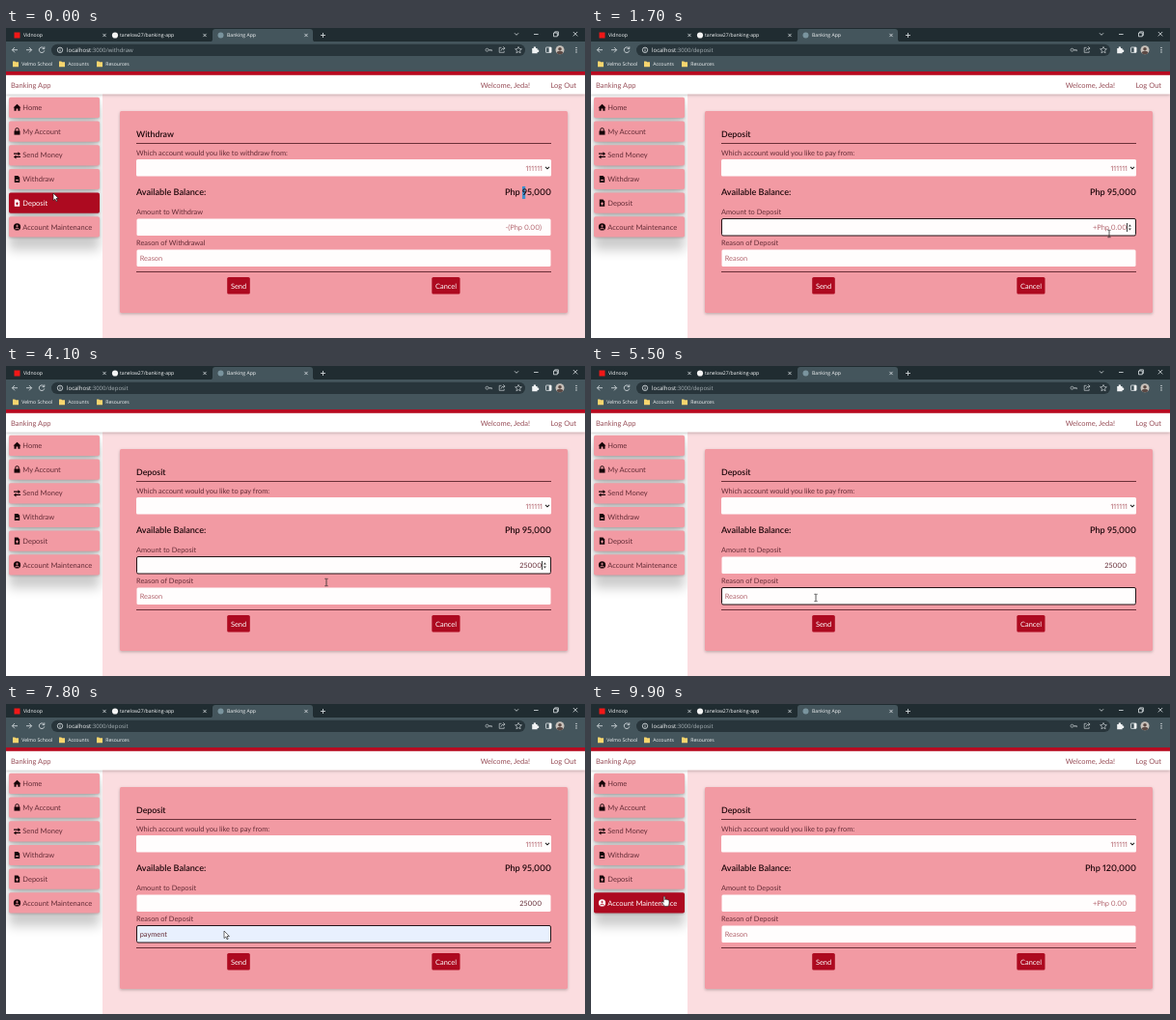
These frames come from a looping animation (600 by 321 pixels, 10 s). An HTML page:

```html
<!DOCTYPE html>
<html lang="en">
<head>
<meta charset="utf-8">
<title>Banking App</title>
<style>
  html, body { margin: 0; width: 100%; height: 100%; overflow: hidden; background: #fbdde0; }
  svg { display: block; width: 600px; height: 321px; }
  text { font: 7.4px Lato, "Open Sans", sans-serif; font-variant-numeric: proportional-nums; fill: #642c36; text-rendering: geometricPrecision; white-space: pre; }
  .ui text { font: 5.1px "Open Sans", "Noto Sans", sans-serif; fill: #f4f6f7; }
  .ui text.url { font-size: 6px; }
  .ui .line { fill: none; stroke: #dfe5e7; stroke-width: .8; }
  .ui .dim { opacity: .75; }
  text.nav { font-size: 7.5px; fill: #974d57; }
  text.bold { font-weight: 600; fill: #1d070b; }
  text.head { font-size: 8.8px; }
  text.sum { font-size: 9.1px; }
  text.hint { fill: #b3666f; }
  text.preview { font: 5.8px "Liberation Sans", Arial, sans-serif; fill: #111; }
  .end { text-anchor: end; }
  .mid { text-anchor: middle; }
  .btn text { fill: #fff; }
  .btn rect { fill: #ad0a20; }
  .item { --bg: #f29aa3; color: #160508; }
  .item.on { --bg: #ad0a20; color: #fff; }
  .item > rect { fill: var(--bg); filter: drop-shadow(0 1px 1px #0003); }
  .item text { font-size: 7.5px; }
  .item.on text { fill: #fff; }
  .item g { fill: currentColor; }
  .item .hole { fill: none; stroke: var(--bg); stroke-width: 1; }
  .field { fill: #fffdfd; }
  .field.focus { stroke: #241417; stroke-width: 1; }
  .rule { stroke: #5c242c; stroke-width: .9; }
</style>
</head>
<body>
<svg viewBox="0 0 600 321" xmlns="http://www.w3.org/2000/svg">
  <defs>
    <filter id="soft" x="-30%" y="-30%" width="160%" height="160%"><feGaussianBlur stdDeviation="6"/></filter>
    <filter id="drop" x="-10%" y="-10%" width="120%" height="130%"><feDropShadow dx="0" dy="1.2" stdDeviation="1.8" flood-opacity=".25"/></filter>
    <clipPath id="side"><rect y="68" width="100" height="253"/></clipPath>
    <clipPath id="face"><circle cx="574" cy="22.7" r="4.5"/></clipPath>
  </defs>

  <rect width="600" height="321" fill="#fbdde0"/>
  <rect y="68" width="100" height="253" fill="#fff"/>
  <g clip-path="url(#side)"><rect x="3" y="80" width="94" height="150" fill="#000" opacity=".2" filter="url(#soft)"/></g>
  <rect y="47" width="600" height="21.3" fill="#fff" filter="url(#drop)"/>
  <rect y="45" width="600" height="3.8" fill="#b70a20"/>
  <text class="nav" x="5" y="61.5">Banking App</text>
  <text class="nav end" x="543" y="61.5">Welcome, Jeda!</text>
  <text class="nav end" x="591" y="61.5">Log Out</text>
  <g id="menu"></g>

  <rect x="118" y="86" width="464" height="209" rx="1.5" fill="#f29aa3" filter="url(#drop)"/>
  <path class="rule" d="M135 119.5H565M135 252.5H565"/>
  <text id="title" class="bold head" x="135" y="113"/>
  <text id="ask" x="135" y="131.6"/>
  <rect class="field" x="135" y="136" width="430" height="17.5" rx="1.5"/>
  <text class="hint end" x="556" y="147.5">111111</text>
  <path d="M559 143.8l2 2 2-2" fill="none" stroke="#222" stroke-width="1.1"/>
  <text class="bold sum" x="135" y="173.3">Available Balance:</text>
  <rect id="mark" x="535" y="164" width="3.2" height="13" fill="#3f8fcb"/>
  <text id="balance" class="bold sum end" x="565" y="173.3"/>
  <text id="amountLabel" x="135" y="193.3"/>
  <rect id="amountBox" class="field" x="135.5" y="197.5" width="429" height="17.5" rx="1.5"/>
  <text id="amount" class="end" x="555" y="209.2"/>
  <path id="spin" d="M556.8 205.6l1.6-2.2 1.6 2.2zM556.8 207.4l1.6 2.2 1.6-2.2z" fill="#444"/>
  <text id="reasonLabel" x="135" y="225"/>
  <rect id="reasonBox" class="field" x="135.5" y="229.5" width="429" height="17.5" rx="1.5"/>
  <text id="reason" x="138.7" y="241"/>
  <rect id="caret" width=".8" height="9" fill="#111"/>
  <g id="send" class="btn"><rect x="229.2" y="258" width="23.6" height="17.6" rx="1.6"/><text class="mid" x="241" y="269.6">Send</text></g>
  <g class="btn"><rect x="441.3" y="258" width="29.2" height="17.6" rx="1.6"/><text class="mid" x="456" y="269.6">Cancel</text></g>

  <g class="ui">
    <rect width="600" height="15" fill="#202c31"/>
    <rect y="14" width="600" height="31" fill="#44555c"/>
    <path d="M211 14.5q3 0 3-3V4q0-3 3-3h98q3 0 3 3v7.5q0 3 3 3z" fill="#44555c"/>
    <rect x="8.5" y="4.5" width="6" height="6" fill="#f01818"/>
    <circle cx="113" cy="7.5" r="3.1" fill="#f4f4f4"/>
    <circle cx="222.5" cy="7.5" r="3" fill="#7a949e"/>
    <text x="18" y="9.4">Vidnoop</text>
    <text x="118" y="9.4">tanelow27/banking-app</text>
    <text x="229" y="9.4">Banking App</text>
    <path id="glyphs" class="line"/>
    <rect x="47" y="16.7" width="491" height="12.4" rx="6.2" fill="#28353b"/>
    <circle class="line" cx="56" cy="22.8" r="2.7"/><path class="line" d="M56 22.2v2.2M56 20.8v.7"/>
    <text class="url" x="63" y="25"><tspan>localhost</tspan><tspan id="path" fill="#a9b3b7"/></text>
    <g class="line">
      <g class="dim" transform="translate(-2.5 0)">
        <circle cx="501" cy="22.7" r="1.5"/><path d="M502.5 22.7h3.4v1.4M504.3 22.7v1.2"/>
        <path d="M516 20.3h-2.3v5h5v-1.6M515.4 23.6q.3-2.6 3.8-2.6M517.6 19.3l2 1.7-2 1.6"/>
      </g>
      <path class="dim" d="M531 19.4l1 2.2 2.4.2-1.8 1.6.5 2.4-2.1-1.3-2.1 1.3.5-2.4-1.8-1.6 2.4-.2z"/>
      <rect x="559.5" y="20" width="5.6" height="5.4" rx=".6"/>
    </g>
    <path d="M545.2 21h1.6a1.2 1.2 0 1 1 2.2 0h1.6v1.6a1.2 1.2 0 1 1 0 2.2v1.4h-5.4z" fill="#f2f4f5"/>
    <path d="M562.7 20h2.4v5.4h-2.4z" fill="#f2f4f5"/>
    <g clip-path="url(#face)"><rect x="569" y="18" width="10" height="10" fill="#c9c2bb"/><circle cx="574" cy="21.7" r="1.8" fill="#5c4a45"/><ellipse cx="574" cy="27" rx="3.6" ry="3.2" fill="#5c4a45"/></g>
    <g fill="#e9edef"><circle cx="591" cy="20.4" r=".7"/><circle cx="591" cy="22.7" r=".7"/><circle cx="591" cy="25" r=".7"/></g>
    <g id="marks"></g>
  </g>

  <g id="cursor">
    <path id="arrow" d="M0 0v7.6l1.8-1.6 1.2 2.7 1.2-.5-1.2-2.7h2.4z" fill="#fff" stroke="#111" stroke-width=".6"/>
    <path id="hand" d="M-.8.6q.8-1.2 1.6 0v3.2l.2-.5q1-.5 1.4.3 1-.4 1.4.4 1.1-.2 1.2.8v2.4q-.2 1.8-1.2 3.2h-3.6q-1-1.8-2.9-4 0-1.2 1.2-.7l.7.7z" fill="#fff" stroke="#111" stroke-width=".6"/>
    <path id="beam" d="M-1.6-3.7h1.2l.4.4.4-.4h1.2M0-3.3v6.6M-1.6 3.7h1.2l.4-.4.4.4h1.2" fill="none" stroke="#222" stroke-width=".75"/>
    <circle id="busy" cx="5.3" cy="1" r="2.2" fill="#d8ecfb" stroke="#1673c4" stroke-width="1.3"/>
  </g>
</svg>
<script>
const LOOP = 10000, STEP = 100;
const $ = id => document.getElementById(id);
const show = (id, on) => { $(id).style.display = on ? "" : "none"; };
const cross = (x, y, r) => `M${x - r} ${y - r}l${2 * r} ${2 * r}m0 ${-2 * r}l${-2 * r} ${2 * r}`;

$("glyphs").setAttribute("d", [102, 206, 311].map(x => cross(x, 7.5, 1.6)).join("") + cross(590, 6.2, 2.2) +
  "M326 7.5h5m-2.5-2.5v5M527 5.3l2 2 2-2M547 6.5h4.6M567.5 5h3.8v3.8h-3.8zM568.7 5v-1.1h3.7v3.7h-1.1" +
  "M12 22.7h-5.5m2.5-2.6l-2.6 2.6 2.6 2.6M21 22.7h5.5m-2.5-2.6l2.6 2.6-2.6 2.6M39.3 21a2.8 2.8 0 1 0 .5 2.4M39.8 19.4v2.2h-2.2");

$("marks").innerHTML = [[7, "Velmo School"], [55, "Accounts"], [94, "Resources"]].map(([x, name]) =>
  `<path d="M${x} 34.4h2.3l.8.8h2.9v5h-6z" fill="#f7d56e"/><text x="${x + 9.3}" y="39.2">${name}</text>`).join("");

// Icons are drawn around their own centre.
const sheet = '<path d="M-2.7-3.6h3.6l1.8 1.8v5.4h-5.4z"/>';
const items = [
  ["Home", '<path d="M0-3.6l4 3.6h-1v3.4h-2.1v-2.3h-1.8v2.3h-2.1v-3.4h-1z"/>'],
  ["My Account", '<path d="M-3-.6h6v4.1h-6z"/><path d="M-1.7 0v-1.8a1.7 1.7 0 0 1 3.4 0v1.8" fill="none" stroke="currentColor" stroke-width="1"/>'],
  ["Send Money", '<path d="M-3.5-2.2h4.5v-1.4l2.6 2-2.6 2v-1.4h-4.5zM3.5 1h-4.5v-1.4l-2.6 2 2.6 2v-1.4h4.5z"/>'],
  ["Withdraw", sheet + '<path class="hole" d="M-1.5 1h3"/>'],
  ["Deposit", sheet + '<path class="hole" d="M-1.5.7h3m-1.5-1.5v3"/>'],
  ["Account Maintenance", '<circle r="3.6"/><circle class="hole" cy="-.9" r=".7"/><path class="hole" d="M-1.9 2.2q1.9-1.6 3.8 0"/>']
];
const top0 = 71.8, pitch = 24.7, tall = 21.2;
$("menu").innerHTML = items.map(([name, icon], i) => `<g class="item" transform="translate(3 ${top0 + i * pitch})">
  <rect width="94" height="${tall}" rx="1.8"/><g transform="translate(8.5 10.6)">${icon}</g><text x="14.3" y="13.3">${name}</text></g>`).join("");
const rows = [...$("menu").children];

// time, x, y, pointer shape
const moves = [
  [0, 49, 171, "arrow"], [200, 47, 176, "hand"], [400, 44, 181, "hand"], [800, 44, 181, "hand"],
  [900, 108, 185, "arrow"], [1400, 537, 212, "beam"], [1600, 537, 213, "beam"], [3400, 537, 213, "beam"],
  [4100, 332, 224, "beam"], [4500, 232.5, 240, "beam"], [5400, 232.5, 240, "beam"], [5500, 233, 240, "beam"],
  [5600, 232, 240, "beam"], [5900, 232, 240, "beam"], [6300, 206, 203.5, "busy"], [6800, 206, 203.5, "busy"],
  [7000, 206, 200, "arrow"], [7600, 206, 200, "arrow"], [8000, 246, 270, "hand"], [8600, 246, 270, "hand"],
  [8700, 238, 262, "arrow"], [9500, 66, 184, "hand"], [9700, 72, 187, "hand"], [9900, 76, 199, "hand"], [LOOP, 76, 199, "hand"]
];
const keys = [2200, 2400, 2700, 2850, 3000];
const PAGE = 800, AMOUNT = 1500, REASON = 4600, PREVIEW = 6100, PICK = 7600, SUBMIT = 8200;

function pointer(t) {
  const i = moves.findIndex(m => m[0] > t) - 1;
  const [t0, x0, y0, shape] = moves[i], [t1, x1, y1] = moves[i + 1], k = (t - t0) / (t1 - t0);
  return { x: x0 + (x1 - x0) * k, y: y0 + (y1 - y0) * k, shape };
}

function write(id, text, kind) {
  const el = $(id);
  el.textContent = text;
  if (kind !== undefined) el.setAttribute("class", kind);
}

function draw(t) {
  const p = pointer(t), deposit = t >= PAGE, sent = t >= SUBMIT;
  const name = deposit ? "Deposit" : "Withdraw", noun = deposit ? "Deposit" : "Withdrawal";
  write("path", ":3000/" + name.toLowerCase());
  write("title", name);
  write("ask", `Which account would you like to ${deposit ? "pay" : "withdraw"} from:`);
  write("balance", sent ? "Php 120,000" : "Php 95,000");
  write("amountLabel", "Amount to " + name);
  write("reasonLabel", "Reason of " + noun);
  show("mark", !deposit);

  const typed = sent ? "" : "25000".slice(0, keys.filter(k => k <= t).length);
  write("amount", typed || (deposit ? "+Php 0.00" : "-(Php 0.00)"), typed ? "end" : "end hint");
  if (t >= PREVIEW && t < PICK) write("reason", "payment", "preview");
  else if (t >= PICK && !sent) write("reason", "payment", "");
  else write("reason", "Reason", "hint");

  const inAmount = t >= AMOUNT && t < REASON, inReason = t >= REASON && t < 8000;
  $("amountBox").classList.toggle("focus", inAmount);
  $("reasonBox").classList.toggle("focus", inReason);
  $("reasonBox").style.fill = t >= PREVIEW && !sent ? "#e8f0fe" : "";
  show("spin", inAmount);

  const since = inReason ? 4800 : [AMOUNT, ...keys].filter(k => k <= t).pop();
  const lit = t < since || Math.floor((t - since) / 500) % 2 === 0;
  show("caret", (inAmount || inReason && t < PICK) && lit);
  $("caret").setAttribute("x", inAmount ? 555 : 138.4);
  $("caret").setAttribute("y", inAmount ? 202 : 233.7);

  rows.forEach((row, i) => {
    const y = p.y - top0 - i * pitch;
    row.classList.toggle("on", p.x < 97 && y >= 0 && y <= tall);
  });
  const onSend = p.x > 229 && p.x < 253 && p.y > 258 && p.y < 276;
  $("send").setAttribute("transform", onSend ? "translate(241 266.8) scale(1.08) translate(-241 -266.8)" : "");

  $("cursor").setAttribute("transform", `translate(${p.x} ${p.y})`);
  for (const s of ["hand", "beam", "busy"]) show(s, p.shape === s);
  show("arrow", p.shape === "arrow" || p.shape === "busy");
}

const start = performance.now();
function tick() {
  const t = (performance.now() - start) % LOOP;
  draw(Math.floor(t / STEP) * STEP);
  requestAnimationFrame(tick);
}
tick();
</script>
</body>
</html>
```
